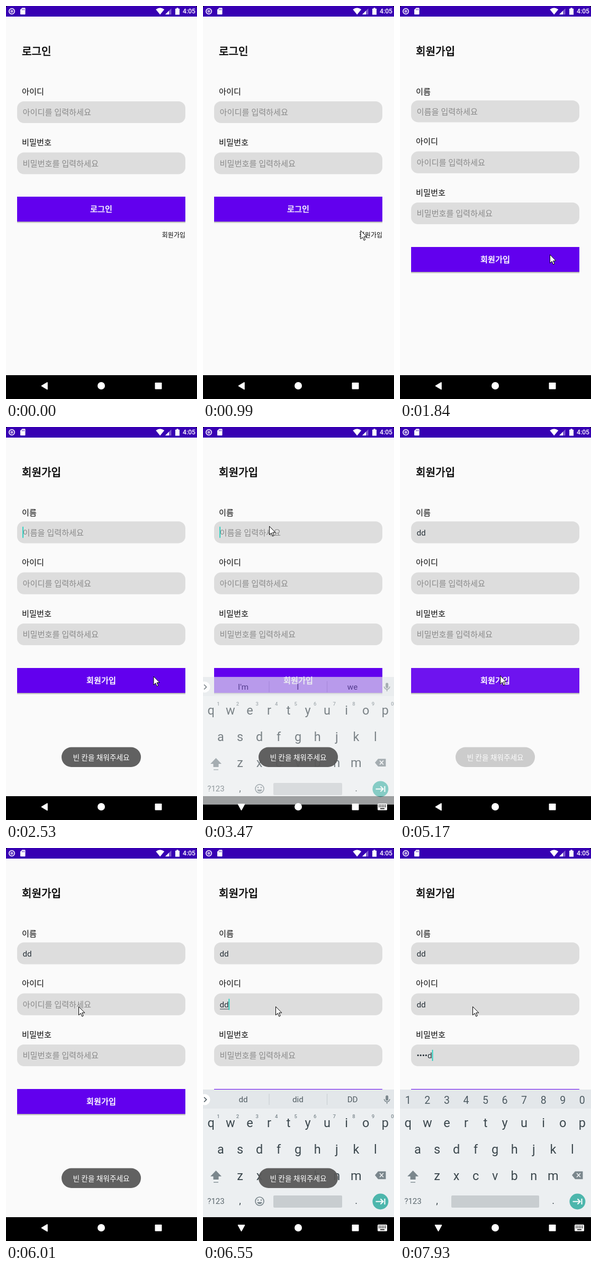
Write an HTML page that moves like this. It is 361 by 742 pixels and loops after 8 s.

```html
<!DOCTYPE html>
<html lang="ko">
<head>
<meta charset="utf-8">
<title>회원가입</title>
<style>
html, body { margin: 0; width: 100%; height: 100%; overflow: hidden; background: #000; }
svg { display: block; font-family: Roboto, "Noto Sans CJK KR", "Noto Sans CJK", sans-serif; }
text { white-space: pre; }
</style>
</head>
<body>
<svg id="stage" width="361" height="742" viewBox="0 0 361 742"></svg>
<script>
const stage = document.getElementById('stage');
const LOOP = 8000, FPS = 13;
const clamp = v => Math.max(0, Math.min(1, v));
const ramp = (t, from, length) => clamp((t - from) / length);

const rect = (x, y, w, h, fill, more = '') =>
  `<rect x="${x}" y="${y}" width="${w}" height="${h}" fill="${fill}" ${more}/>`;
const path = (d, fill, more = '') => `<path d="${d}" fill="${fill}" ${more}/>`;
const circle = (x, y, r, fill, more = '') =>
  `<circle cx="${x}" cy="${y}" r="${r}" fill="${fill}" ${more}/>`;
const text = (x, y, s, size, fill, more = '') =>
  `<text x="${x}" y="${y}" font-size="${size}" fill="${fill}" ${more}>${s}</text>`;
const group = (body, dy = 0, alpha = 1) =>
  `<g transform="translate(0 ${dy})" opacity="${alpha}">${body}</g>`;
const line = (color, width) => `stroke="${color}" stroke-width="${width}"`;
const MID = 'text-anchor="middle"';

// Pages
const INK = '#0a0a0a', HINT = '#8a8a8a';
const backdrop = rect(0, 0, 361, 697, '#fafafa') + rect(0, 0, 361, 20, '#3700b3');
const title = s => text(30, 92.5, s, 20.1, INK, line(INK, .7));
const label = (y, s) => text(30, y + 5.7, s, 15.2, INK);
const field = y => rect(21, y - 20.6, 318, 41.2, '#ddd', 'rx="13"');
const hint = (y, s) => text(31.5, y + 5.8, s + ' 입력하세요', 15.2, HINT);
const button = (y, s) =>
  rect(21, y + 3, 318, 47, '#000', 'opacity=".1"') +
  rect(21, y + 1.5, 318, 47, '#000', 'opacity=".22"') +
  rect(21, y, 318, 47, '#6200ee') +
  text(180, y + 29, s, 15.2, '#fff', MID + line('#fff', .55));

const login = backdrop + title('로그인') +
  label(161, '아이디') + field(200.5) + hint(200.5, '아이디를') +
  label(257, '비밀번호') + field(297) + hint(297, '비밀번호를') +
  button(360, '로그인') + text(339, 437, '회원가입', 12, INK, 'text-anchor="end"');

const rows = [198.8, 295.2, 391.5];
const hints = ['이름을', '아이디를', '비밀번호를'];
const pressed = t => Math.max(...[1950, 4960].map(s =>
  .12 * ramp(t, s, 80) * (1 - ramp(t, s + 100, 250))));

// Each entry: time, focused field, its content from then on
const edits = [
  [1300, 0, ''], [3240, 0, ''], [4000, 0, 'd'], [4180, 0, 'dd'],
  [6080, 1, ''], [6300, 1, 'd'], [6530, 1, 'dd'], [6920, 2, '']
];
for (let i = 0; i < 5; i++) edits.push([7300 + 154 * i, 2, '•'.repeat(i) + 'd']);

function signup(t) {
  const values = ['', '', ''];
  let focus = 0, since = 1300;
  for (const [at, i, s] of edits) if (t >= at) { values[i] = s; focus = i; since = at; }
  let out = backdrop + title('회원가입') +
    label(161, '이름') + label(255.5, '아이디') + label(352, '비밀번호') + button(455, '회원가입') +
    rect(21, 455, 318, 47, '#fff', `opacity="${pressed(t)}"`);
  rows.forEach((y, i) => {
    const s = values[i];
    out += field(y) + (s ? text(31.5, y + 5.8, s, 15.2, '#263038') : hint(y, hints[i]));
    if (i !== focus) return;
    const dots = s.split('•').length - 1;
    const w = dots * 5.2 + (s.length - dots) * 8.6;
    const composing = i === 0 ? t < 4300 : i === 1;
    if (s && composing) out += rect(32, y + 8.4, w, 1, '#37474f');
    if ((t - since) % 1000 < 500) out += rect(31.2 + w, y - 10.5, 1.8, 21, '#1fcfbe');
  });
  return out;
}

// Status and navigation bars
const status =
  path('M0 0H4A4 4 0 0 0 0 4ZM361 0H357A4 4 0 0 1 361 4Z', '#000') +
  circle(11, 10, 5.2, 'none', line('#efe9fa', 1.8)) + circle(11, 10, 2.8, '#b7a3e2') +
  path('M30.5 3.5H35.5Q36.5 3.5 36.5 4.5V15Q36.5 16 35.5 16H28Q27 16 27 15V7Z', '#fff') +
  path('M30.5 5.5V8M32.5 5.5V8M34.5 5.5V8', 'none', line('#3700b3', .8)) +
  path('M283.3 6.6Q291.2 .6 299.2 6.6L291.2 16.3Z', '#fff') +
  path('M301 16H312.5V4.5Z', '#fff', 'opacity=".35"') + path('M301 16H308V9Z', '#fff') +
  path('M320 5H322.3V3.5H325.7V5H328V16.5H320Z', '#fff') +
  text(334, 14.2, '4:05', 12.2, '#fff', 'font-weight="500"');

function navigation(t, typing) {
  const glow = ramp(t, 4220, 120) * (1 - ramp(t, 4420, 300));
  let out = rect(32, 697.5, 81, 40.5, '#fff', `rx="20" opacity="${.17 * glow}"`) +
    path(typing ? 'M66.5 712H78.5L72.5 723Z' : 'M67.5 717.3L78 711V723.6Z', '#fff',
      line('#fff', 1.6) + ' stroke-linejoin="round"') +
    circle(180, 717, 7, '#fff') + rect(281.5, 711, 13, 12.5, '#fff', 'rx="1"');
  if (typing) {
    out += rect(330, 711, 18, 12.5, '#fff', 'rx="1.5"') + rect(335, 719.7, 8, 1.6, '#000');
    for (let i = 0; i < 10; i++)
      out += rect(332 + i % 5 * 3, 713 + (i / 5 | 0) * 3, 1.7, 1.7, '#000');
  }
  return out;
}

// On-screen keyboard
const KEY = '#3b474d', SOFT = '#7b878d', STEP = 36.55;
const keys = (s, x, y, size = 23.5, color = KEY, more = '') =>
  [...s].map((c, i) => text(x + i * STEP, y, c, size, color, MID + more)).join('');

function suggestions(t) {
  if (t >= 4300 && t < 6180) return null;
  const typed = t < 4300 ? [4000, 4180] : [6300, 6530];
  return t < typed[0] ? ["I'm", 'I', 'we'] : t < typed[1] ? ['d', 'do', 'did'] : ['dd', 'did', 'DD'];
}

function keyboard(t) {
  const secret = t >= 6920, words = suggestions(t);
  let out = rect(0, 456, 361, 241, '#eceff1') + rect(0, 456, 361, 36, '#e3e7ea') +
    keys('qwertyuiop', 15.3, 527) + keys('asdfghjkl', 33.5, 577) + keys('zxcvbnm', 70, 626.5) +
    path('M24.5 609L35 620H29.5V626H19.5V620H14Z', SOFT) + rect(20, 630.5, 9, 1.3, SOFT) +
    path('M325 617.8L331 610.5H345.5V625.2H331Z', SOFT) +
    path('M334 614L341 621.5M341 614L334 621.5', 'none', line('#eceff1', 1.7)) +
    text(24.5, 672.3, '?123', 15, '#5d696f', MID) +
    text(70, 672.3, ',', 18, KEY, MID) + text(289.5, 672.3, '.', 18, KEY, MID) +
    circle(335.4, 667.5, 15, '#4db6ac') +
    path('M326.5 667.5H340M335.5 662.5L340.5 667.5L335.5 672.5M343.5 662V673', 'none', line('#fff', 2));
  if (secret) return out + rect(97, 656, 166, 23, '#c8cdd0', 'rx="2"') +
    keys('1234567890', 15.3, 482.5, 19.5, '#4c5a61');
  out += rect(133, 656, 130, 23, '#c8cdd0', 'rx="2"') +
    keys('1234567890', 29, 510, 9.5, SOFT, ' font-weight="500"') +
    circle(107, 667, 8, 'none', line(SOFT, 1.7)) +
    circle(104, 664.7, 1.3, SOFT) + circle(110, 664.7, 1.3, SOFT) +
    path('M102.3 668.5H111.7A4.8 4.8 0 0 1 102.3 668.5Z', SOFT) +
    circle(3, 475, 10.5, '#fff') +
    path('M2 470.5L6.5 475L2 479.5', 'none', line('#46535a', 1.7)) +
    rect(345.2, 467, 5, 10, SOFT, 'rx="2.5"') +
    path('M342.5 474A5.2 5.2 0 0 0 352.9 474M347.7 479V483', 'none', line(SOFT, 1.6));
  if (words) out += rect(124.5, 464, 1, 21, '#c6cccf') + rect(234, 464, 1, 21, '#c6cccf') +
    words.map((s, i) => text(76 + 103.3 * i, 480.3, s, 15.2, '#4f5b61', MID)).join('');
  return out;
}

function slideKeyboard(t) {
  const opened = t < 5000 ? 3412 : 6180;
  if (t < opened || (t > 4447 && t < 6180)) return '';
  const hidden = (1 - ramp(t, opened, 250)) ** 5;
  const leaving = t < 5000 ? ramp(t, 4297, 150) ** 5 : 0;
  return group(keyboard(t), 48 * hidden + 24 * leaving, (1 - hidden) * (1 - leaving));
}

// Toast message
function toast(t) {
  const alpha = Math.max(...[2150, 5050].map(s => ramp(t, s, 350) * (1 - ramp(t, s + 2040, 390))));
  return group(rect(105, 604.5, 150, 37.5, '#585858', 'rx="18.7" opacity=".94"') +
    text(180, 628.6, '빈 칸을 채워주세요', 13.65, '#fff', MID), 0, alpha);
}

// Pointer: time, x, y
const route = [
  [150, 340, 725], [230, 325, 600], [300, 303, 475], [380, 292, 440], [460, 298, 433],
  [600, 298, 433], [690, 306, 436], [830, 306, 436], [920, 293, 421], [990, 298, 424],
  [1680, 298, 424], [1840, 283.5, 469.5], [1920, 279, 471], [2540, 279, 471],
  [2860, 165, 130], [3100, 125.5, 187.5], [3540, 125.5, 187.5], [4150, 92.5, 697],
  [4450, 92.5, 697], [4900, 189.5, 469.5], [5540, 189.5, 469.5], [6000, 137.5, 299.5],
  [LOOP, 137.5, 299.5]
];

function pointer(t) {
  const i = route.findIndex(p => p[0] > t);
  if (i < 1) return '';
  const [t0, x0, y0] = route[i - 1], [t1, x1, y1] = route[i];
  const p = (t - t0) / (t1 - t0), e = p * p * (3 - 2 * p);
  return `<g transform="translate(${x0 + (x1 - x0) * e} ${y0 + (y1 - y0) * e})">` +
    path('M0 0V16L3.7 12.5L6.3 18.5L8.7 17.4L6.2 11.6H11.3Z', '#fff', line('#000', 1)) + '</g>';
}

function scene(t) {
  const enter = 1 - (1 - ramp(t, 1260, 200)) ** 2;
  const typing = (t >= 3400 && t < 4300) || t >= 6180;
  return (enter < 1 ? group(login, -8 * enter) : '') +
    (enter > 0 ? group(signup(t), 16 * (1 - enter), enter) : '') +
    status + rect(0, 697, 361, 45, '#000') +
    slideKeyboard(t) + navigation(t, typing) + toast(t) + pointer(t);
}

let shown = -1;
function tick() {
  const step = Math.floor((performance.now() % LOOP + 10) * FPS / 1000) % (LOOP * FPS / 1000);
  if (step !== shown) {
    shown = step;
    stage.innerHTML = scene(step * 1000 / FPS);
  }
  requestAnimationFrame(tick);
}
tick();
</script>
</body>
</html>
```
